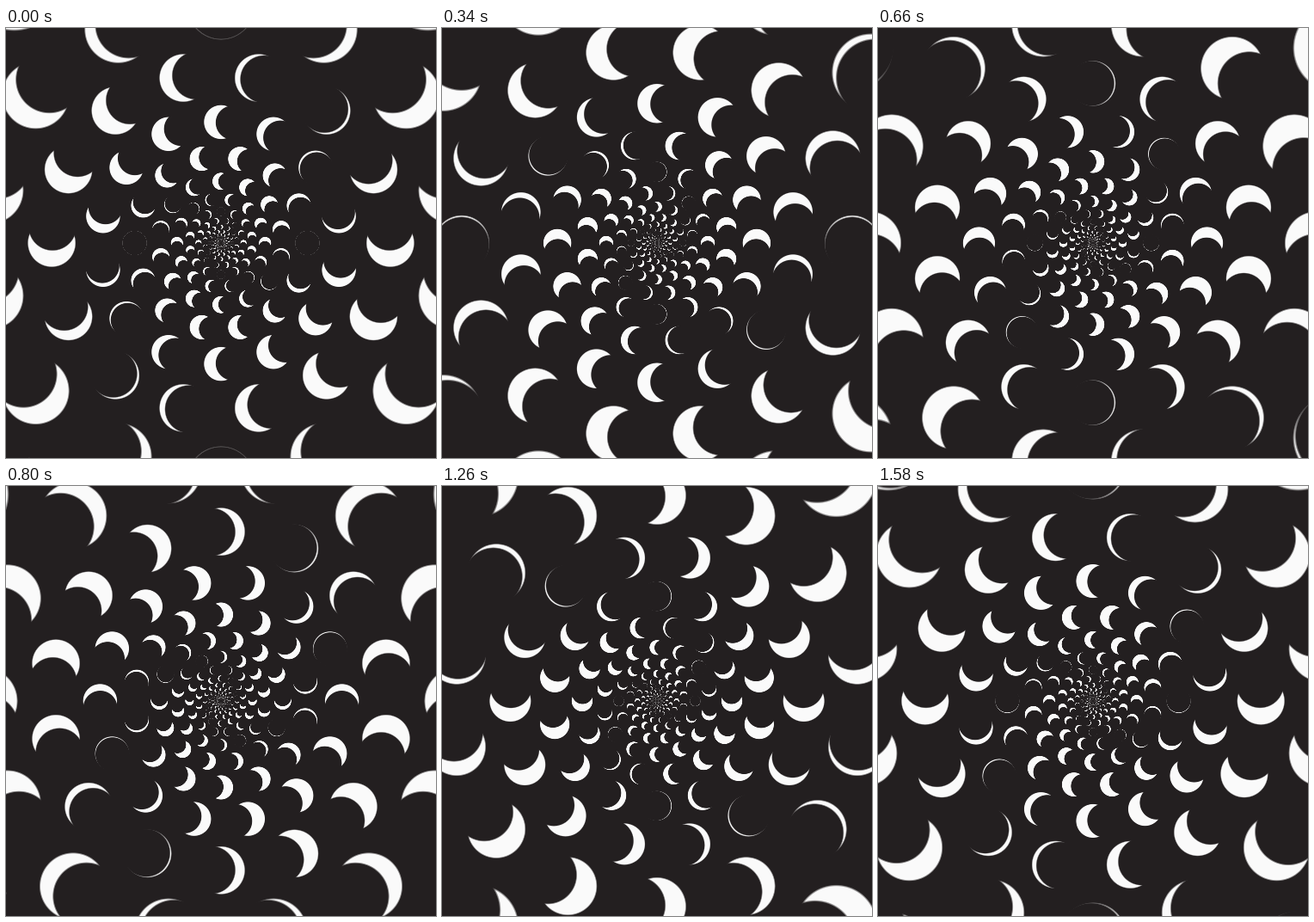
An HTML page with a canvas for the animation above (1600 ms loop, 500 by 500 pixels).

```html
<!DOCTYPE html>
<html>
<head>
<meta charset="utf-8">
<style>
  html, body { margin: 0; height: 100%; overflow: hidden; background: #231f20; }
  canvas { display: block; }
</style>
</head>
<body>
<canvas id="stage" width="500" height="500"></canvas>
<script>
const ctx = document.getElementById('stage').getContext('2d');
const LOOP = 1600, TAU = Math.PI * 2;
const ARMS = 14, STEP = TAU / ARMS;
const GROWTH = 1.4;      // radius ratio between neighbouring rings
const SIZE = 0.141;      // disc radius relative to ring radius
const SWING = STEP / 4;  // largest rotation of a shadow away from its disc

function disc(ringRadius, angle, radius, rgb) {
  const x = 250 + ringRadius * Math.cos(angle);
  const y = 250 - ringRadius * Math.sin(angle);
  const soft = ctx.createRadialGradient(x, y, radius * 0.97, x, y, radius * 1.02);
  soft.addColorStop(0, `rgb(${rgb})`);
  soft.addColorStop(1, `rgba(${rgb},0)`);
  ctx.fillStyle = soft;
  ctx.beginPath();
  ctx.arc(x, y, radius * 1.02, 0, TAU);
  ctx.fill();
}

function draw(now) {
  const t = (now % LOOP) / LOOP;
  ctx.fillStyle = '#231f20';
  ctx.fillRect(0, 0, 500, 500);
  for (let ring = -14; ring <= 4; ring++) {
    const level = ring + 2 * t;
    const r = 100.4 * GROWTH ** level;
    for (let arm = 0; arm < ARMS; arm++) {
      const angle = (arm + (ring & 1) / 2) * STEP;
      const phase = angle - level * TAU / 12 + t * TAU;
      disc(r, angle, r * SIZE, '250,250,250');
      disc(r, angle - SWING * Math.sin(phase), r * SIZE * 1.005, '35,31,32');
    }
  }
  requestAnimationFrame(draw);
}
requestAnimationFrame(draw);
</script>
</body>
</html>
```
